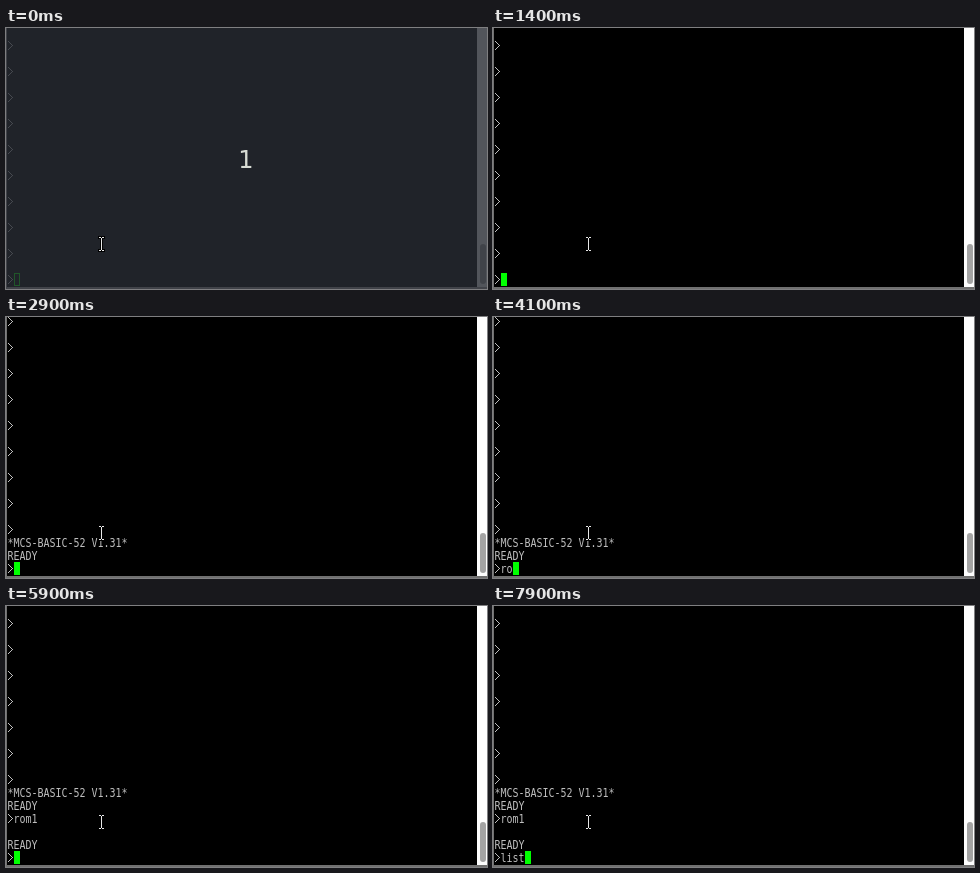
Write an HTML page with a canvas that moves like this. It is 481 by 261 pixels and loops after 8 s.

```html
<!DOCTYPE html>
<html lang="en">
<head>
<meta charset="utf-8">
<title>Terminal session</title>
<style>
html, body { margin: 0; width: 100%; height: 100%; overflow: hidden; background: #000; }
canvas { display: block; width: 481px; height: 261px; }
</style>
</head>
<body>
<canvas id="stage" width="481" height="261"></canvas>
<script>
const ctx = document.getElementById('stage').getContext('2d');
const W = 481, H = 261, LOOP = 8000;
const CELL_W = 6, CELL_H = 13, LEFT = 2, ROWS = 20;
const BOTTOM_ROW = 245;

const BANNER = '*MCS-BASIC-52 V1.31*';
const READY = [BANNER, 'READY'];
const AFTER_ROM = [...READY, '>rom1', '', 'READY'];

// Lines printed below the old, empty prompts, by start time.
const timeline = [
  [0, ['', '>']],
  [2700, [BANNER.slice(0, 17)]],
  [2900, [...READY, '>']],
  [4100, [...READY, '>ro']],
  [4400, [...READY, '>rom']],
  [5000, [...READY, '>rom1']],
  [5700, AFTER_ROM],
  [5900, [...AFTER_ROM, '>']],
  [7400, [...AFTER_ROM, '>li']],
  [7600, [...AFTER_ROM, '>lis']],
  [7900, [...AFTER_ROM, '>list']]
];

function rect(color, x, y, w, h) {
  ctx.fillStyle = color;
  ctx.fillRect(x, y, w, h);
}

function drawPrompt(x, top) {
  for (let i = 0; i < 9; i++) ctx.fillRect(x + 4 - Math.abs(i - 4), top + 2 + i, 1, 1);
}

function drawLine(line, top) {
  ctx.fillStyle = '#bebebe';
  ctx.font = '10px "DejaVu Sans Mono", monospace';
  ctx.textAlign = 'left';
  ctx.textBaseline = 'alphabetic';
  [...line].forEach((char, col) => {
    const x = LEFT + col * CELL_W;
    if (char === '>') return drawPrompt(x, top);
    ctx.save();
    ctx.translate(x, top + 11);
    ctx.scale(1, 1.23);
    ctx.fillText(char, -0.5, 0);
    ctx.restore();
  });
}

function drawCursor(column, focused) {
  const x = LEFT + column * CELL_W;
  if (focused) {
    rect('#00ff00', x, BOTTOM_ROW, CELL_W, CELL_H);
  } else {
    ctx.strokeStyle = '#00ff00';
    ctx.lineWidth = 1;
    ctx.strokeRect(x + 0.5, BOTTOM_ROW + 0.5, CELL_W - 1, CELL_H - 1);
  }
}

function drawWindow(focused) {
  const border = focused ? '#707070' : '#a4a2a0';
  rect('#000', 0, 0, W, H);
  rect('#fdfdfd', 471, 0, 10, 259);
  ctx.fillStyle = '#a3a3a3';
  ctx.beginPath();
  ctx.roundRect(474, 216, 6, 40, 3);
  ctx.fill();
  rect(border, 0, 0, 1, H);
  rect(border, 0, 259, W, 2);
}

function drawCountdown() {
  rect('rgba(40, 44, 52, 0.8)', 0, 0, W, H);
  ctx.fillStyle = '#d8dcd4';
  ctx.font = '24px "DejaVu Sans", sans-serif';
  ctx.textAlign = 'center';
  ctx.fillText('1', 240, 140);
}

function drawPointer() {
  const parts = [[93, 209, 2, 1], [96, 209, 2, 1], [95, 210, 1, 12], [93, 222, 2, 1], [96, 222, 2, 1]];
  for (const [x, y, w, h] of parts) rect('#000', x - 1, y - 1, w + 2, h + 2);
  for (const part of parts) rect('#e8e8e8', ...part);
}

function draw(time) {
  const focused = time >= 1400;
  const lines = timeline.filter(([start]) => start <= time).pop()[1];
  drawWindow(focused);
  for (let up = 0; up < ROWS; up++) {
    const older = up - lines.length;
    const line = older < 0 ? lines[lines.length - 1 - up] : older % 2 ? '' : '>';
    drawLine(line, BOTTOM_ROW - up * CELL_H);
  }
  drawCursor(lines[lines.length - 1].length, focused);
  if (time < 400) drawCountdown();
  drawPointer();
}

const begin = performance.now();
function tick() {
  draw((performance.now() - begin) % LOOP);
  requestAnimationFrame(tick);
}
tick();
</script>
</body>
</html>
```
